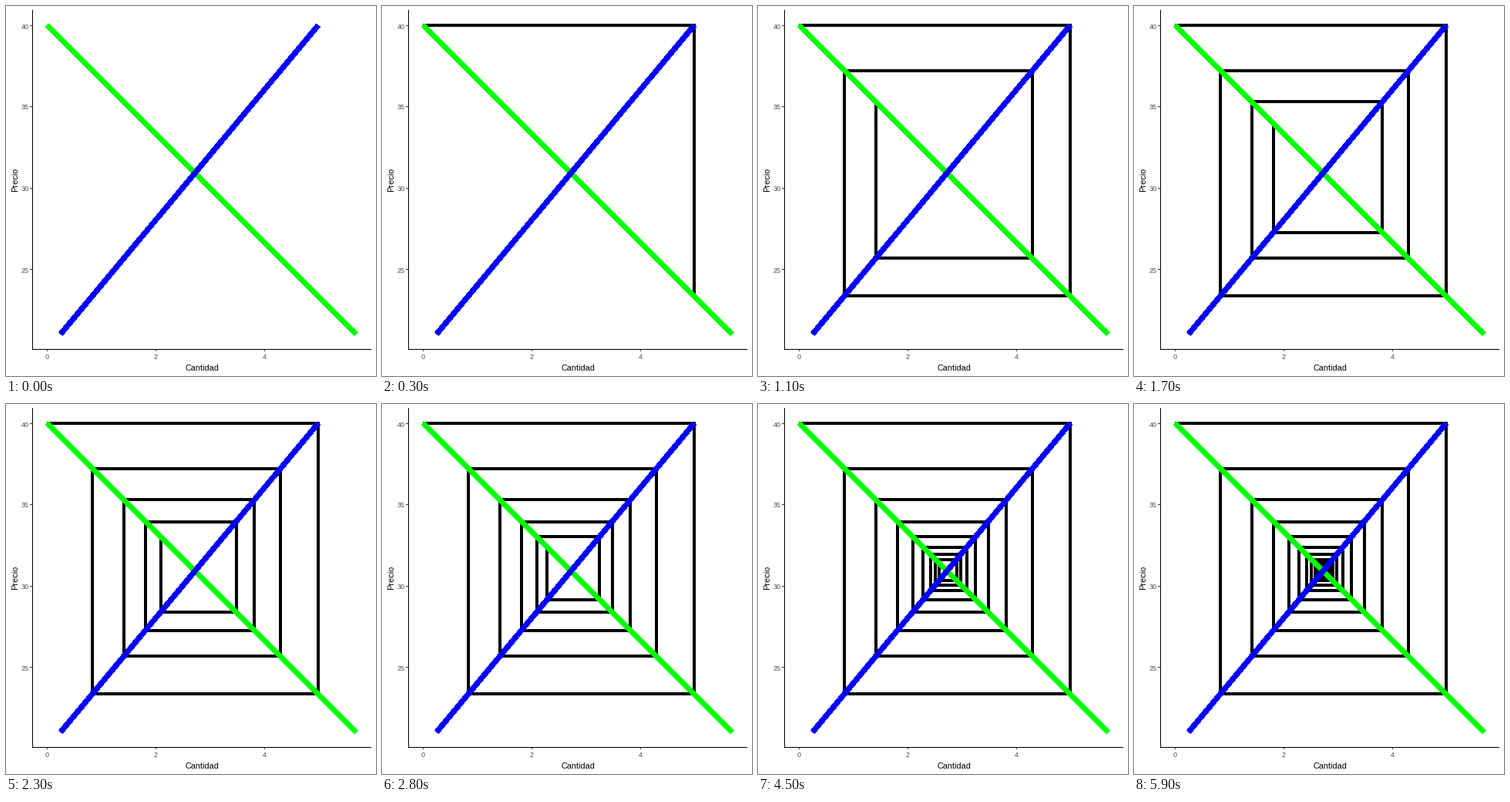
Write a matplotlib script that moves like this. It is 480x480 px and loops after 10 s.

```python
import matplotlib.pyplot as plt
from matplotlib.animation import FuncAnimation

SIZE, DPI = 480, 96
FRAMES, INTERVAL = 100, 100
PERIODS = 35
START_PRICE = 40

LEFT, RIGHT, TOP, BOTTOM = 34, 474, 5, 445


def pt(px):
    """Pixels to points."""
    return px * 72 / DPI


def to_x(q):
    return 53.45 + 70.28 * q


def to_y(p):
    return 25.18 + 21.06 * (40 - p)


def supply(p):
    return 0.25 * p - 5


def demand(p):
    return 12 - 0.3 * p


def demand_price(q):
    return (12 - q) / 0.3


fig = plt.figure(figsize=(SIZE / DPI, SIZE / DPI), dpi=DPI, facecolor="white")
ax = fig.add_axes([0, 0, 1, 1])
ax.set_xlim(0, SIZE)
ax.set_ylim(SIZE, 0)
ax.axis("off")


def stroke(xs, ys, color, width, z):
    line, = ax.plot(xs, ys, color=color, lw=pt(width), zorder=z,
                    antialiased=False, snap=False,
                    solid_capstyle="butt", solid_joinstyle="round")
    return line


def label(x, y, text, size, color, **kw):
    ax.text(x, y, text, fontsize=pt(size), color=color,
            family="Liberation Sans", **kw)


def draw_axes():
    stroke([LEFT + 0.5] * 2, [TOP, BOTTOM + 1], "black", 1, 1)
    stroke([LEFT, RIGHT], [BOTTOM + 0.5] * 2, "black", 1, 1)
    for p in (25, 30, 35, 40):
        y = round(to_y(p)) + 0.5
        stroke([LEFT - 3, LEFT], [y, y], "#333333", 1, 1)
        label(29.8, y + 4, str(p), 9, "#4d4d4d", ha="right", va="baseline")
    for q in (0, 2, 4):
        x = round(to_x(q)) + 0.5
        stroke([x, x], [BOTTOM + 1, BOTTOM + 3], "#333333", 1, 1)
        label(x, 458.5, str(q), 9, "#4d4d4d", ha="center", va="baseline")
    label(254, 473, "Cantidad", 10.7, "black", ha="center", va="baseline")
    label(17, 225.5, "Precio", 11, "black", ha="right", va="center",
          rotation=90)


def draw_curves():
    prices = (21, 40)
    ys = [to_y(p) for p in prices]
    stroke([to_x(demand(p)) for p in prices], ys, "#00ff00", 6, 3)
    stroke([to_x(supply(p)) for p in prices], ys, "#0000ff", 6, 4)


def cobweb():
    """Corner points: start, then two corners for each period."""
    p = START_PRICE
    points = [(demand(p), p)]
    for _ in range(PERIODS):
        q = supply(p)
        points.append((q, p))
        p = demand_price(q)
        points.append((q, p))
    return [(round(to_x(q)), round(to_y(p))) for q, p in points]


draw_axes()
draw_curves()
web = stroke([], [], "black", 4, 2)
corners = cobweb()
# Each period ends on a whole frame; its vertical part appears at once.
ends = [round(k * (FRAMES - 1) / PERIODS) for k in range(PERIODS + 1)]


def update(n):
    k = max(i for i, end in enumerate(ends) if end <= n)
    path = corners[:2 * k + 1]
    if n > ends[k]:
        part = (n - ends[k]) / (ends[k + 1] - ends[k])
        x, y = path[-1]
        path = path + [(x + part * (corners[2 * k + 1][0] - x), y)]
    web.set_data([x for x, _ in path], [y for _, y in path])
    return web,


anim = FuncAnimation(fig, update, frames=FRAMES, interval=INTERVAL,
                     init_func=lambda: update(0), repeat=True, repeat_delay=0)
plt.show()
```
